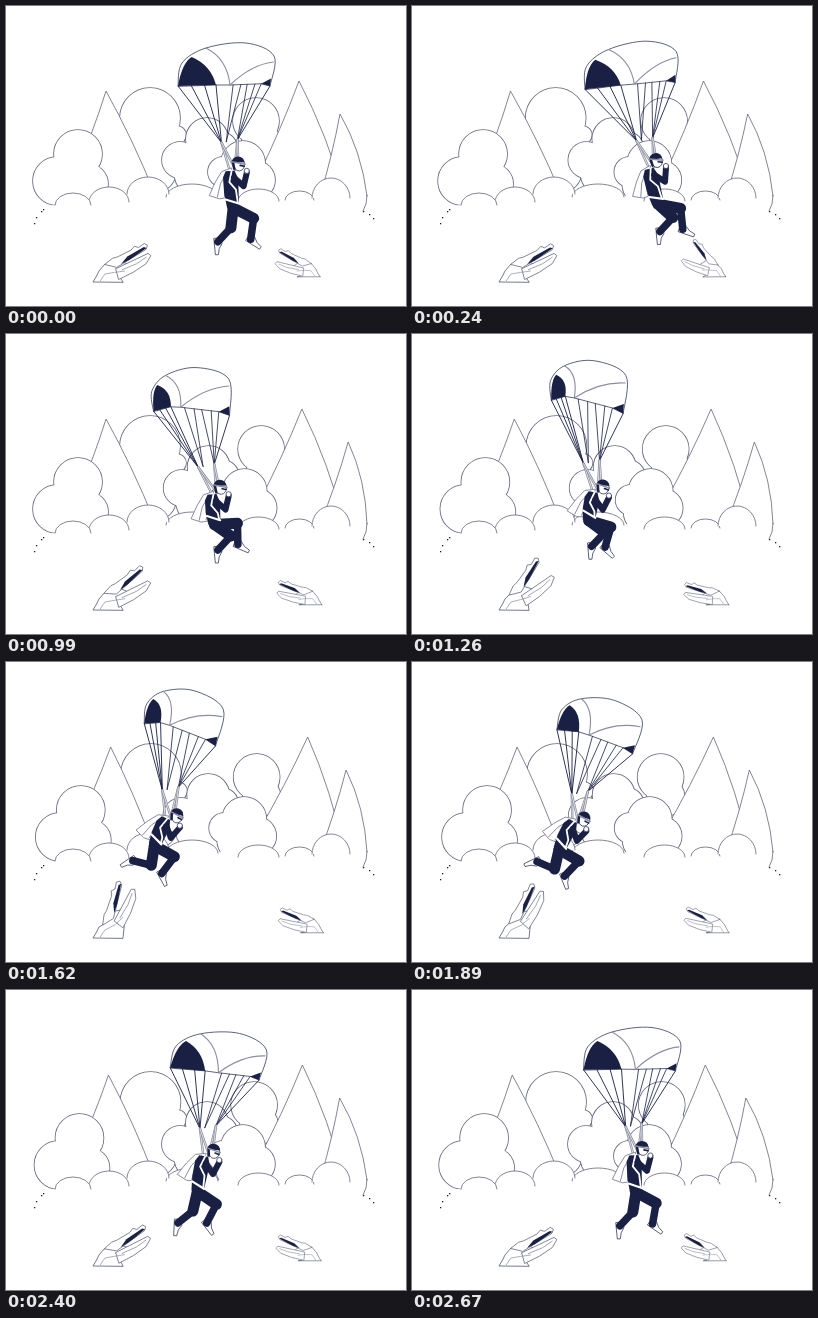
An HTML page with a canvas for the animation above (2700 ms loop, 400x300 px).

```html
<!DOCTYPE html>
<html lang="en">
<head>
<meta charset="utf-8">
<title>Parachutist over crocodiles</title>
<style>
html, body { margin: 0; height: 100%; overflow: hidden; background: #fff; }
canvas { display: block; }
</style>
</head>
<body>
<canvas id="stage" width="400" height="300"></canvas>
<script>
const c = document.getElementById('stage').getContext('2d');
const NAVY = '#192044', EDGE = '#64667f', GREY = '#8c8da0';
const DURATION = 2700, STEP = 30, RAD = Math.PI / 180;
let now = 0;

// Looping swing: mean plus first and second harmonics
function swing(mean, cos1, sin1, cos2 = 0, sin2 = 0) {
  const a = now / DURATION * 2 * Math.PI;
  return mean + cos1 * Math.cos(a) + sin1 * Math.sin(a) + cos2 * Math.cos(2 * a) + sin2 * Math.sin(2 * a);
}
// Rises to 1 around a moment and falls again
function pulse(center, width, power = 2) {
  const d = Math.abs(now - center);
  return Math.exp(-((Math.min(d, DURATION - d) / width) ** power));
}
const mix = (a, b, k) => a.map((v, i) => v + (b[i] - v) * k);
const pairs = (...a) => a.flatMap((v, i) => i % 2 ? [] : [[v, a[i + 1]]]);
const step = ([x, y], deg, length) => [x + length * Math.cos(deg * RAD), y + length * Math.sin(deg * RAD)];
const rotate = (deg, [ox, oy] = [0, 0]) => ([x, y]) => {
  const cos = Math.cos(deg * RAD), sin = Math.sin(deg * RAD);
  return [ox + x * cos - y * sin, oy + x * sin + y * cos];
};

function paint(fill, stroke, width = 0.8) {
  if (fill) { c.fillStyle = fill; c.fill(); }
  if (stroke) { c.strokeStyle = stroke; c.lineWidth = width; c.stroke(); }
}
function trace(points) {
  c.beginPath();
  points.forEach(p => c.lineTo(...p));
}
function line(points, stroke, width) { trace(points); paint(null, stroke, width); }
function shape(points, fill, stroke, width) { trace(points); c.closePath(); paint(fill, stroke, width); }
function curve(a, q, b, stroke, width) {
  c.beginPath(); c.moveTo(...a); c.quadraticCurveTo(...q, ...b); paint(null, stroke, width);
}
function splineTo(p) {
  for (let i = 0; i < p.length - 1; i++) {
    const a = p[i - 1] || p[i], b = p[i], d = p[i + 1], e = p[i + 2] || d;
    c.bezierCurveTo(b[0] + (d[0] - a[0]) / 6, b[1] + (d[1] - a[1]) / 6,
      d[0] - (e[0] - b[0]) / 6, d[1] - (e[1] - b[1]) / 6, ...d);
  }
}

// Joined circles with only the outer edge drawn
function cloud(dx, ...circles) {
  for (const stroke of [EDGE, null]) for (const [x, y, r] of circles) {
    c.beginPath(); c.arc(x + dx, y, r, 0, 7);
    paint(stroke ? null : '#fff', stroke, 1.6);
  }
}
function fir(x0, y0, ax, ay, x1, y1, bend) {
  c.beginPath(); c.moveTo(x0, y0);
  c.quadraticCurveTo((x0 + ax) / 2 + 2, (y0 + ay) / 2 + 2, ax, ay);
  c.quadraticCurveTo((x1 + ax) / 2 + bend, (y1 + ay) / 2 - bend / 2, x1, y1);
  paint('#fff', EDGE);
}
function bush(x0, x1, top, base) {
  c.beginPath();
  c.ellipse((x0 + x1) / 2, base, (x1 - x0) / 2, base - top, 0, Math.PI, 2 * Math.PI);
  paint('#fff', EDGE);
}

function drawTrees() {
  const left = swing(1.5, -1.5, -3.3), right = swing(3.5, -3.5, -4);
  const far = swing(4, -4, 2), round = swing(1.5, -1.5, 3.5);
  cloud(left * 0.2, [144, 112, 30], [171, 129, 9], [152, 140, 26], [148, 165, 22]);
  cloud(far * 0.2, [201, 133, 21], [215, 142, 16], [174, 154, 18], [198, 165, 30]);
  cloud(round, [250, 115, 23], [255, 135, 19]);
  fir(68, 170, 100 + left, 85, 148, 186, 3);
  fir(252, 170, 293 + right, 75, 338, 190, 6);
  fir(314, 190, 334 + far, 108, 361, 190, 8);
  line(pairs(361, 189, 360, 198, 357, 205), EDGE, 0.8);
  cloud(far * 0.2, [237, 157, 22], [217, 166, 15], [250, 174, 19], [232, 178, 22]);
  cloud(left * 0.6, [51, 175, 24], [72, 148, 24], [82, 178, 20], [68, 170, 16]);
  shape(pairs(30, 199.5, 46, 199.5, 84, 196, 122, 189, 162, 187, 212, 190, 275, 193,
    308, 192, 344, 190, 352, 206, 400, 206, 400, 300, 0, 300), '#fff');
  bush(160, 212, 178, 191);
  bush(232, 273, 183, 195);
  bush(279, 308, 185, 194);
  bush(306, 344, 172, 192);
  bush(83, 123, 181, 196);
  bush(121, 163, 171, 188);
  bush(49, 85, 187, 199);
  c.fillStyle = NAVY;
  for (const p of pairs(37, 203, 35, 205, 30, 211, 28, 217, 357, 205, 363, 208, 367, 212))
    c.fillRect(...p, 1.3, 1.3);
}

// Long head turning on a fixed body; angles of both jaws in degrees
function drawCroc(x, y, scale, flip, upper, lower) {
  const top = rotate(upper), low = rotate(lower);
  c.save();
  c.translate(x, y);
  c.scale(flip * scale, scale);
  shape([...pairs(-16, 13, -13, 8, -10, 2), ...pairs(-2, -6, 12, -4).map(top),
    ...pairs(20, 2, 8, 13).map(low), [14, 13]], '#fff', NAVY, 0.6);
  shape(pairs(6, 2, 42, -2, 44, 1, 37, 7, 22, 11, 6, 13).map(low), '#fff', EDGE, 0.8);
  shape(pairs(-2, -6, 8, -8, 13, -7, 28, -7, 33, -9, 36, -6, 43, -7, 45, -4, 42, -1, 8, 2).map(top),
    '#fff', EDGE, 0.8);
  shape(pairs(13, 1, 22, -3, 41, -4, 43, -2, 30, 0, 22, 1).map(top), NAVY);
  line(pairs(12, 5, 28, 4, 39, 1).map(low), GREY, 0.8);
  line([[-9, 12], [-4, 5], low([4, 5]), low([14, 7])], GREY, 0.7);
  c.restore();
}

function drawCanopy(center, left, right, neck) {
  // Corner, shoulder, upper left, top, shoulder, corner, seam, panel: facing and turned away
  const front = pairs(-48, 20, -44, -3, -20, -18, 20, -23, 48, -10, 44, 20, 4, 19, -10, 19);
  const turned = pairs(-35, 19, -39, 0, -28, -17, 0, -27, 34, -18, 38, 20, -13, 13, -22, 13);
  const place = rotate(swing(6, -6, -10), center);
  const [l, a, p, t, r, b, m, d] = front.map((v, i) => place(mix(v, turned[i], swing(0.5, -0.5, 0))));
  const hem = mix(b, m, 0.22), panel = mix(a, p, 0.4);
  hem[1] -= 2;

  c.beginPath(); c.moveTo(...l);
  splineTo([l, a, p, t, r, b]);
  c.lineTo(...hem);
  c.lineTo(...m);
  c.lineTo(...d);
  c.closePath();
  paint('#fff', NAVY, 0.7);

  c.beginPath(); c.moveTo(...l);
  c.quadraticCurveTo(...a, ...panel);
  const bulge = mix(panel, d, 0.5);
  c.quadraticCurveTo(bulge[0] + 7, bulge[1] - 6, ...d);
  c.closePath();
  paint(NAVY);
  shape([b, hem, mix(r, b, 0.75)], NAVY);

  const rim = mix(r, b, 0.2), mid = mix(p, m, 0.5), arch = mix(rim, m, 0.5);
  curve(p, [mid[0] + 9, mid[1] - 8], m, GREY, 1.1);
  curve(rim, [arch[0], arch[1] - 9], m, GREY, 1.1);

  for (const k of [0, 0.35, 0.7, 1]) line([mix(l, d, k), left], NAVY, 0.9);
  for (const k of [0.1, 0.35]) line([mix(m, hem, k), mix(left, right, 0.3)], NAVY, 0.8);
  for (const k of [0.55, 0.8, 1]) line([mix(m, hem, k), right], NAVY, 0.8);
  line([b, right], NAVY, 0.9);
  for (const [from, dx] of [[left, -5], [left, 1], [right, 0], [right, 4]]) {
    const strap = [from, [neck[0] + dx, neck[1]]];
    line(strap, GREY, 2.4);
    line(strap, '#fff', 0.7);
  }
}

function drawLeg(hip, thigh, thighLength, shin, shinLength, toe) {
  const knee = step(hip, thigh, thighLength), ankle = step(knee, shin, shinLength);
  shape(pairs(-4, -2, 2, -4, 7, -1, 13, 0, 13, 3, -3, 4).map(rotate(toe, ankle)), '#fff', NAVY, 0.7);
  line([hip, knee], NAVY, 11);
  line([knee, ankle], NAVY, 7.5);
}

function drawPerson(shoulder, lean, neck) {
  const body = rotate(lean, shoulder), length = swing(27, 4, 0);
  const hip = body([0, length]), hand = body([16, -3]), elbow = body([12, 10]);

  shape(pairs(1, -9, -9, -6, -16, 4, -23, 17, -13, 21, -3, 20).map(body), '#fff', GREY, 1);
  line(pairs(-3, -6, -11, 6, -15, 19).map(body), GREY, 1);
  line(pairs(-4, 1, -8, 19).map(body), GREY, 1);

  // The back leg kicks behind while drifting back
  const backThigh = 69 - 34 * Math.tanh(4 * swing(0, -0.28, 0.96));
  const backShin = 133 + 70 * pulse(1880, 430, 4), shin = swing(105, -7, -28);
  drawLeg(hip, backThigh, 20, backShin, 19, backShin - 45);
  drawLeg(hip, swing(16, 3, -22, 8), 23, shin, 21, shin - 62);

  shape([[-5, -6], [4, -6], [7, 2], [6, length], [-6, length], [-8, length / 2], [-8, 0]].map(body), NAVY);
  line([[1, -6], [-2, 5], [4, 13], [5, length - 5]].map(body), '#fff', 1.8);
  line([[-7, length - 9], [6, length - 4]].map(body), '#fff', 2.2);
  line([body([3, 1]), elbow, hand], NAVY, 6);
  c.beginPath(); c.arc(hand[0], hand[1] - 2, 2.6, 0, 7); paint('#fff', NAVY, 0.7);

  c.save();
  c.translate(...body([8, -13]));
  c.rotate(lean * 0.6 * RAD);
  c.beginPath(); c.ellipse(1, 1, 5.5, 6.5, 0, 0, 7); paint('#fff', NAVY, 0.7);
  c.beginPath(); c.ellipse(0, -1, 6.5, 6, 0, Math.PI, 2 * Math.PI); paint(NAVY);
  line(pairs(-5, -1, -4, 5), NAVY, 2.5);
  line(pairs(-6, -2, 7, 1), GREY, 1.5);
  line(pairs(2, 2, 6, 3), NAVY, 1.6);
  c.restore();
}

function draw() {
  c.fillStyle = '#fff';
  c.fillRect(0, 0, 400, 300);
  c.lineJoin = c.lineCap = 'round';
  drawTrees();

  drawCroc(103, 263, 1, 1, -26 - 45 * pulse(1620, 520), -19 - 39 * pulse(1720, 380));
  const snap = pulse(240, 180);
  drawCroc(302 + swing(1.5, -1.5, -1), 261, 0.75, -1,
    -20 - 28 * snap + 7 * pulse(1260, 300), -6 - 6 * snap + 4 * pulse(1260, 300));

  const shoulder = [swing(199, 26, 34), swing(167, 4, 0, 0, -2)];
  const center = [swing(198, 22, 3), swing(60, 4, 0, -4, -2)];
  const lean = swing(5, -9, -20), neck = rotate(lean, shoulder)([4, -7]);
  const knot = mix(shoulder, center, 0.31);
  drawCanopy(center, [knot[0] - 8, knot[1]], [knot[0] + 8, knot[1] - 3], neck);
  drawPerson(shoulder, lean, neck);
}

const start = performance.now();
function loop() {
  now = Math.floor((performance.now() - start) % DURATION / STEP) * STEP;
  draw();
  requestAnimationFrame(loop);
}
loop();
</script>
</body>
</html>
```
